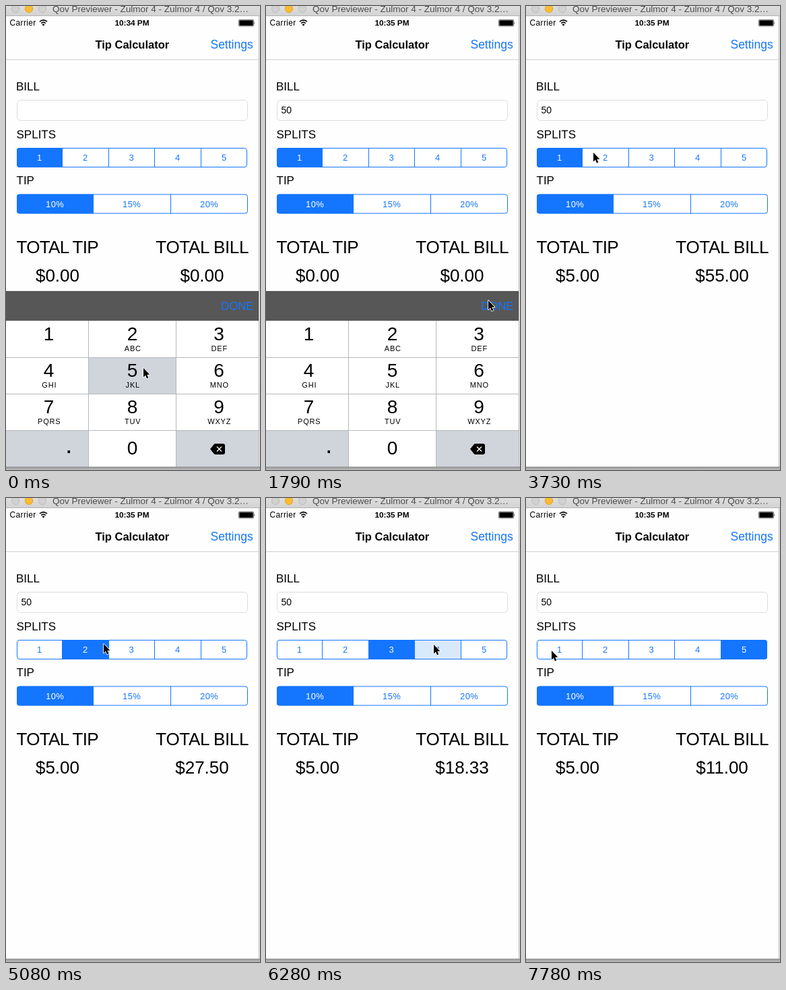
Write an HTML page that moves like this. It is 377 by 687 pixels and loops after 8 s.

```html
<!DOCTYPE html>
<html lang="en">
<head>
<meta charset="utf-8">
<title>Tip Calculator</title>
<style>
  html, body { margin: 0; width: 100%; height: 100%; overflow: hidden; background: #fff; }
  svg { display: block; width: 100vw; height: 100vh; }
  text { font-family: "Liberation Sans", Arial, sans-serif; white-space: pre; }
  .mid { text-anchor: middle; }
  .end { text-anchor: end; }
  .blue { fill: #1475ff; }
  .label { font-size: 17px; }
  .big { font-size: 26px; }
  .seg { font-size: 13px; letter-spacing: .4px; }
  .digit { font-size: 28px; }
  .letters { font-size: 11px; letter-spacing: .8px; }
</style>
</head>
<body>
<svg viewBox="0 0 377 687" preserveAspectRatio="none">
  <defs>
    <linearGradient id="chrome" x2="0" y2="1">
      <stop stop-color="#dedede"/><stop offset="1" stop-color="#d3d3d3"/>
    </linearGradient>
    <linearGradient id="shade" x2="0" y2="1">
      <stop stop-color="#929292"/><stop offset="1" stop-color="#bdbdbd"/>
    </linearGradient>
    <clipPath id="screen"><rect y="15" width="375" height="667"/></clipPath>
    <clipPath id="splitClip"><rect x="16" y="210" width="342" height="29" rx="4"/></clipPath>
    <clipPath id="tipClip"><rect x="16" y="278.5" width="343" height="29" rx="4"/></clipPath>
  </defs>

  <rect width="377" height="687" fill="#e9e9e9"/>
  <rect x="375" y="14" width="1" height="670" fill="#b9b9b9"/>
  <rect y="682" width="377" height="5" fill="url(#shade)"/>
  <rect width="375" height="667" y="15" fill="#fefefe"/>

  <rect width="377" height="14" fill="url(#chrome)"/>
  <rect y="14" width="377" height="1" fill="#b4b4b4"/>
  <g fill="#d1d1d1" stroke="#bcbcbc">
    <circle cx="14" cy="4" r="5.7"/>
    <circle cx="34" cy="4" r="5.7" fill="#fdbc32" stroke="#e3a32a"/>
    <circle cx="54" cy="4" r="5.7"/>
  </g>
  <text x="69" y="9" font-size="13.5" fill="#4b4b4b">Qov Previewer - Zulmor 4 - Zulmor 4 / Qov 3.2…</text>

  <text x="5.5" y="29" font-size="12" letter-spacing=".35">Carrier</text>
  <g fill="none" stroke="#000" stroke-width="1.7">
    <path d="M50 23.2Q55.5 18.4 61 23.2M52.2 25.6Q55.5 22.6 58.8 25.6"/>
    <path d="M55.5 29.6L53.4 27.4Q55.5 25.6 57.6 27.4Z" fill="#000" stroke="none"/>
  </g>
  <text id="clock" class="mid" x="187" y="29" font-size="11.8" font-weight="bold"></text>
  <rect x="345.3" y="20.3" width="22.4" height="9.6" rx="1.8" fill="none" stroke="#000" stroke-width=".6"/>
  <rect x="346.3" y="21.3" width="20.4" height="7.6" rx=".8"/>
  <path d="M368.5 23.4Q370 25.1 368.5 26.8Z"/>

  <text class="mid" x="187.3" y="63" font-size="16.5" font-weight="bold">Tip Calculator</text>
  <text class="blue end" x="366.7" y="63" font-size="17.5">Settings</text>
  <rect y="79" width="375" height="1" fill="#d0d0d0"/>

  <text class="label" x="15" y="125">BILL</text>
  <rect x="16.5" y="139.5" width="342" height="30" rx="5" fill="#fff" stroke="#dcdcdc"/>
  <text id="bill" x="22.5" y="159" font-size="14"></text>
  <rect id="caret" y="145" width="2" height="19" fill="#426bf2"/>

  <text class="label" x="15.5" y="195.5">SPLITS</text>
  <g id="splits"></g>
  <text class="label" x="15.5" y="264">TIP</text>
  <g id="tips"></g>

  <text class="big" x="15.5" y="366.4" letter-spacing="-.7">TOTAL TIP</text>
  <text class="big end" x="360" y="366.4" letter-spacing="-.35">TOTAL BILL</text>
  <text id="tipTotal" class="big mid" x="76.5" y="408"></text>
  <text id="billTotal" class="big mid" x="291" y="408"></text>

  <g clip-path="url(#screen)"><g id="pad">
    <rect y="422" width="375" height="44" fill="#575757"/>
    <text id="done" class="blue end" x="367.5" y="450" font-size="16.8">DONE</text>
    <g id="keys"></g>
    <path d="M303 656L308.5 649.3Q309.5 648 311 648H322Q325 648 325 651V661Q325 664 322 664H311Q309.5 664 308.5 662.7Z"/>
    <path d="M313 652.5l7 7m0 -7l-7 7" stroke="#fff" stroke-width="1.3"/>
  </g></g>

  <path id="cursor" d="M0 0V13.4L3 10.7L5 15.5L7.3 14.5L5.3 9.8H9.4Z"
        stroke="#fff" stroke-width="1.7" stroke-linejoin="round" paint-order="stroke"/>
</svg>
<script>
const NS = 'http://www.w3.org/2000/svg';
const $ = id => document.getElementById(id);

function add(parent, tag, attrs, text = '') {
  const el = document.createElementNS(NS, tag);
  for (const k in attrs) el.setAttribute(k, attrs[k]);
  el.textContent = text;
  return parent.appendChild(el);
}

// Segmented control; returns a function that paints its state.
function segments(box, clip, edges, top, labels) {
  const cells = labels.map((_, i) => add(box, 'rect', {
    x: edges[i], y: top, width: edges[i + 1] - edges[i], height: 29, 'clip-path': `url(#${clip})`
  }));
  const first = edges[0], last = edges[edges.length - 1];
  add(box, 'rect', {
    x: first + .5, y: top + .5, width: last - first - 1, height: 28, rx: 3.5, fill: 'none', stroke: '#1475ff'
  });
  edges.slice(1, -1).forEach(x => add(box, 'rect', { x, y: top, width: 1, height: 29, fill: '#1475ff' }));
  const texts = labels.map((s, i) =>
    add(box, 'text', { class: 'seg mid', x: (edges[i] + edges[i + 1]) / 2 + .2, y: top + 19.2 }, s));
  return (on, pressed) => cells.forEach((cell, i) => {
    cell.setAttribute('fill', i === on ? '#1475ff' : i === pressed ? '#d9e9fc' : '#fff');
    texts[i].setAttribute('fill', i === on ? '#fff' : '#1475ff');
  });
}

const paintSplits = segments($('splits'), 'splitClip', [16, 83, 152, 220, 289, 358], 210, [...'12345']);
segments($('tips'), 'tipClip', [16, 129, 244, 359], 278.5, ['10%', '15%', '20%'])(0, -1);

const cols = [0, 122, 252, 375], mids = [63.5, 187.5, 316];
const letters = ['', 'ABC', 'DEF', 'GHI', 'JKL', 'MNO', 'PQRS', 'TUV', 'WXYZ'];
const keys = [...'123456789.0 '].map((s, i) => {
  const c = i % 3, y = 466 + 54 * Math.floor(i / 3), plain = i < 9 || i === 10;
  const key = add($('keys'), 'rect', {
    x: cols[c], y, width: cols[c + 1] - cols[c], height: 54, fill: plain ? '#fff' : '#d0d4db'
  });
  if (plain) add($('keys'), 'text', { class: 'digit mid', x: mids[c], y: y + (i < 9 ? 29.4 : 36.4) }, s);
  if (letters[i]) add($('keys'), 'text', { class: 'letters mid', x: mids[c] + .8, y: y + 45 }, letters[i]);
  return key;
});
add($('keys'), 'rect', { x: 91.5, y: 658, width: 3.5, height: 4 });
const line = (x, y, width, height) => add($('keys'), 'rect', { x, y, width, height, fill: '#b6b8bc' });
[520, 574, 628].forEach(y => line(0, y, 375, 1));
[122, 252].forEach(x => line(x, 466, 1, 216));

// Cursor stops: tick, x, y
const path = [
  [0, 204, 536], [1, 204, 537], [4, 194, 648], [7, 194, 649], [12, 330, 436], [13, 330, 436],
  [15, 339, 437], [16, 339, 437], [17, 341, 442], [20, 341, 442], [25, 100, 217], [30, 100, 217],
  [32, 120, 217], [33, 120, 217], [34, 145, 216], [36, 176, 217], [38, 176, 217], [42, 249, 217],
  [43, 249, 217], [46, 308, 217], [48, 308, 217], [51, 56, 227], [52, 38, 226], [60, 38, 226]
];

function cursorAt(n) {
  const i = path.findIndex(p => p[0] > n);
  const [n0, x0, y0] = path[i - 1], [n1, x1, y1] = path[i];
  const u = (n - n0) / (n1 - n0), e = u * u * (3 - 2 * u);
  return [x0 + (x1 - x0) * e, y0 + (y1 - y0) * e];
}

const picks = [33, 38, 43, 48];
const within = (n, a, b) => n >= a && n <= b;

function draw(n) {
  const paid = n >= 20;
  const split = picks.filter(p => n >= p).length;
  const bill = n < 1 ? '' : n < 6 ? '5' : '50';

  $('clock').textContent = n < 4 ? '10:34 PM' : '10:35 PM';
  $('bill').textContent = bill;
  $('caret').setAttribute('x', 23 + 7.8 * bill.length);
  $('caret').style.opacity = within(n, 1, 3) || within(n, 6, 9) || within(n, 14, 17) ? 1 : 0;

  paintSplits(split, picks.includes(n + 1) ? split + 1 : -1);
  $('tipTotal').textContent = paid ? '$5.00' : '$0.00';
  $('billTotal').textContent = '$' + (paid ? 55 / (split + 1) : 0).toFixed(2);

  keys[4].setAttribute('fill', n === 0 ? '#d0d4db' : '#fff');
  keys[10].setAttribute('fill', n === 5 ? '#d0d4db' : '#fff');
  $('done').style.opacity = n < 17 ? 1 : n < 20 ? .3 : .65;
  $('pad').setAttribute('transform', `translate(0 ${n < 20 ? 0 : n === 20 ? 213 : 270})`);
  $('cursor').setAttribute('transform', `translate(${cursorAt(n)})`);
}

const tickAt = t => Math.floor((t + (t < 1790 ? 0 : t < 3430 ? 10 : 20)) / 150);

const start = performance.now();
let shown = -1;
function frame(now) {
  const n = tickAt(Math.max(0, now - start) % 8000);
  if (n !== shown) draw(shown = n);
  requestAnimationFrame(frame);
}
draw(0);
requestAnimationFrame(frame);
</script>
</body>
</html>
```
